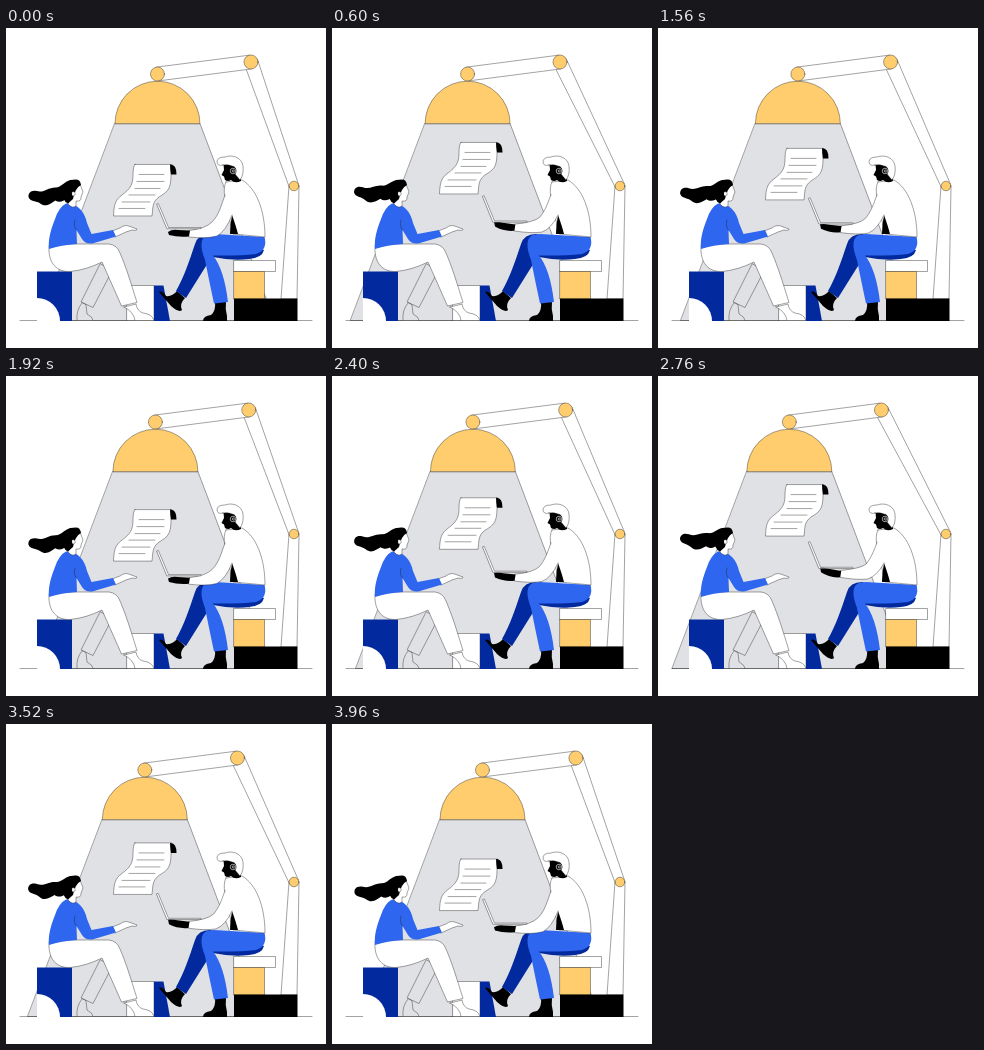
Animation, 320 px wide and 320 px high, one loop 4000 ms. Source, as an HTML page:

```html
<!DOCTYPE html>
<html lang="en">
<head>
<meta charset="utf-8">
<title>Work under the lamp</title>
<style>
  html, body { margin: 0; width: 100%; height: 100%; overflow: hidden; background: #fff; }
  svg { display: block; width: 100%; height: 100%; }
  .line { fill: none; stroke: #222; stroke-width: .42; stroke-linejoin: round; stroke-linecap: round; }
  .white { fill: #fff; }
  .gold { fill: #ffcd6e; }
  .grey { fill: #e0e1e5; }
  .navy { fill: #022a9e; }
  .blue { fill: #2f66f0; }
  .black { fill: #000; }
  .ear { fill: none; stroke: #fff; stroke-width: .6; }
</style>
</head>
<body>
<svg viewBox="0 0 320 320">
  <!-- lamp -->
  <path id="beam" class="line grey"/>
  <path class="line" d="M14 292.500H306"/>
  <path class="line white" d="M283 158L275 271H291L293 158Z"/>
  <path id="lowerArm" class="line white"/>
  <path id="upperArm" class="line white"/>
  <g id="shade" class="line">
    <path class="gold" d="M109 95.500A42.500 42.300 0 0 1 194 95.500Z"/>
    <circle class="gold" cx="151.500" cy="46" r="7"/>
  </g>
  <circle id="elbow" class="line gold" cx="245" cy="34" r="7"/>
  <circle class="line gold" cx="288" cy="158" r="4.800"/>

  <!-- sheet -->
  <g id="sheet">
    <path class="line white" d="M129 136.500H166Q164 141 165 147C165 162 161 164 153 169C146 174 147 180 146 188H107.500C108 177 109 172 116 167C124 161 127 157 127 147Q127 138 129 136.500Z"/>
    <path class="black" d="M164 136.500Q170.500 136 170.500 146.500H165Q164 140 164 136.500Z"/>
    <path class="line" d="M133 146.500H158M131 153.500H158M129 160.500H154M123 167H149M116 174H144M113 180.500H139"/>
  </g>

  <!-- blocks -->
  <path class="navy" d="M31 243.500H66V293H31Z"/>
  <path class="white" d="M31 270A23 23 0 0 1 54 293H31Z"/>
  <path class="line white" d="M121 257.500H148V292.500H121Z"/>
  <path class="navy" d="M148 257.500H157.500L164 293H148Z"/>
  <path class="line white" d="M228 232.500H269.500V243.500H228Z"/>
  <path class="line gold" d="M228 243.500H258.500V271H228Z"/>
  <path class="black" d="M228 270.500H291.500V293H228Z"/>

  <!-- woman -->
  <path class="line grey" d="M94 236L75 274L87 279.500L106 243Z"/>
  <path class="line grey" d="M76 275Q70 282 71 292.500H87Q87 289 81 286L80 277Z"/>
  <path class="line white" d="M118 279L130 276Q131 283 137 285Q146 286 148 292.500H129Q128 284 118 279Z"/>
  <path class="line white" d="M43 218C42 232 48 244 64 243.500Q80 242 96 234Q104 252 115.500 278L131 274.500C124 252 120 239 114 225Q111 217 103 216H66Z"/>
  <path class="line white" d="M106 203L114 200Q119 196 124 198.500L131 201Q131 203 126 202L120 204L109 209Z"/>
  <path class="blue" d="M60 175.500Q68 175 74 181Q79 186 81 195L85.500 206L107 202L110 208.500L88 215Q80 217 76 211L70.500 202L71 216Q55 217 43 221C42 211 45 201 49 191Q53 179 60 175.500Z"/>
  <path class="line" d="M70.500 202Q67 198 69 192"/>
  <path class="line white" d="M63 165L62 176Q66 181 70 178L70 173Q75.500 174 75 169L77 164L74 156L66 157Z"/>
  <path id="tail" class="black" d="M70 152C60 150 57 158 50 157C42 156 38 161 31 158C25 156 22 159 22 163C23 168 29 167 33 171C38 176 44 172 48 170C52 173 56 172 60 169L68 166Z"/>
  <path class="black" d="M75 157Q74 150 67 152C61 152 57 158 57 164Q56 173 62 175.500L67 171Q69 160 75 157Z"/>
  <path class="line white" d="M66 164Q70 163 69 167Q67 169 66 167Z"/>

  <!-- man -->
  <path class="black" d="M153 264Q156 262 160 268Q166 269 171 263L179 270Q173 276 176 282Q173 285 165 278Q159 271 153 264Z"/>
  <path class="black" d="M209 273H220Q219 281 221 288V293H197Q197 288 205 287Q210 283 209 273Z"/>
  <path class="navy" d="M204 206Q192 206 189 216C183 234 178 249 170 263L180 270L200 238L207 229Q226 233 243 231Q256 230 258 222Z"/>
  <path class="blue" d="M208 206L258.500 209Q262 222 250 226Q232 228 207 227.500Q218 241 222 274L208 275.500Q203 252 199 232Q191 211 201 207Z"/>
  <path class="line white" d="M220 154L236 152C250 160 259 182 259 209L227 206L219 170Q217 159 220 154Z"/>
  <path class="black" d="M226 187Q224 197 224 206H232Q230 198 226 187Z"/>
  <path class="black" d="M217.500 136L218 142L215.500 147L218 148.500L219 152Q222 154 225 152Q229 156 235 153L234 136Z"/>
  <path class="line white" d="M217 137Q211 139 211 133Q212 129 219 129C227 126 236 130 237 138Q238 147 234 152L229 146Q231 138 226 138Q222 136 217 137Z"/>
  <circle class="black" cx="227" cy="143" r="3.400"/>
  <circle class="ear" cx="227" cy="143" r="2.800"/>
  <circle class="ear" cx="227.300" cy="143" r="1.100"/>
  <path id="forearm" class="white"/>
  <path id="forearmLine" class="line"/>
  <path id="hand" class="black"/>
  <path id="laptop" class="line white"/>
</svg>
<script>
const SWING = 1000; // one way
const part = id => document.getElementById(id);

// Blend the numbers of two paths that share the same commands.
function blend(from, to, k) {
  const ends = to.match(/[\d.]+/g);
  let i = 0;
  return from.replace(/[\d.]+/g, n => (+n + (ends[i++] - n) * k).toFixed(2));
}

const poses = {
  beam: ['M109 95.5H194L268.5 292.5H34.5Z', 'M82.5 95.5H167.5L242 292.5H8Z'],
  upperArm: ['M150.6 39.1L244.1 27.1L245.9 40.9L152.4 52.9Z',
             'M124.1 39.1L215.8 27.1L217.6 40.9L125.9 52.9Z'],
  lowerArm: ['M251.6 31.7L292.6 156.5L283.4 159.5L238.4 36.3Z',
             'M222.8 30.6L292.3 155.8L283.7 160.2L210.5 37.4Z'],
  forearm: ['M219 167C215 178 213 187 206 194Q199 201 183 202.5L183 209Q200 211 211 208Q220 203 226 187Z',
            'M219 166C216 175 213 180 209 186Q204 190 182 192L182 199Q198 202 209 201.5Q219 199 226 187Z'],
  hand: ['M162 204Q166 201 172 202L184 202.5L183 208.500Q172 209.500 163 207Z',
         'M162 186.5Q165 188 170 190L183 192.5L182 199Q172 200 163 193Z'],
  laptop: ['M151 176L152.4 175.500L162.5 199.5H195V200.7H161.2Z',
           'M150.5 163L151.9 162.5L162.5 188.7H195V189.9H161.2Z']
};
poses.forearmLine = poses.forearm.map(d => d.replace('L', 'M').replace('Z', ''));

function draw(now) {
  const phase = now % (2 * SWING) / SWING;
  const k = 1 - Math.abs(1 - phase);
  for (const [id, [from, to]] of Object.entries(poses))
    part(id).setAttribute('d', blend(from, to, k));
  const move = (id, value) => part(id).setAttribute('transform', value);
  move('shade', `translate(${-26.5 * k} 0)`);
  move('elbow', `translate(${-28.3 * k} 0)`);
  move('sheet', `translate(0 ${-36.7 * k})`);
  move('tail', `rotate(${10 * k - 8} 67 162)`);
}

const start = performance.now();
function tick() {
  draw(performance.now() - start);
  requestAnimationFrame(tick);
}
tick();
</script>
</body>
</html>
```
